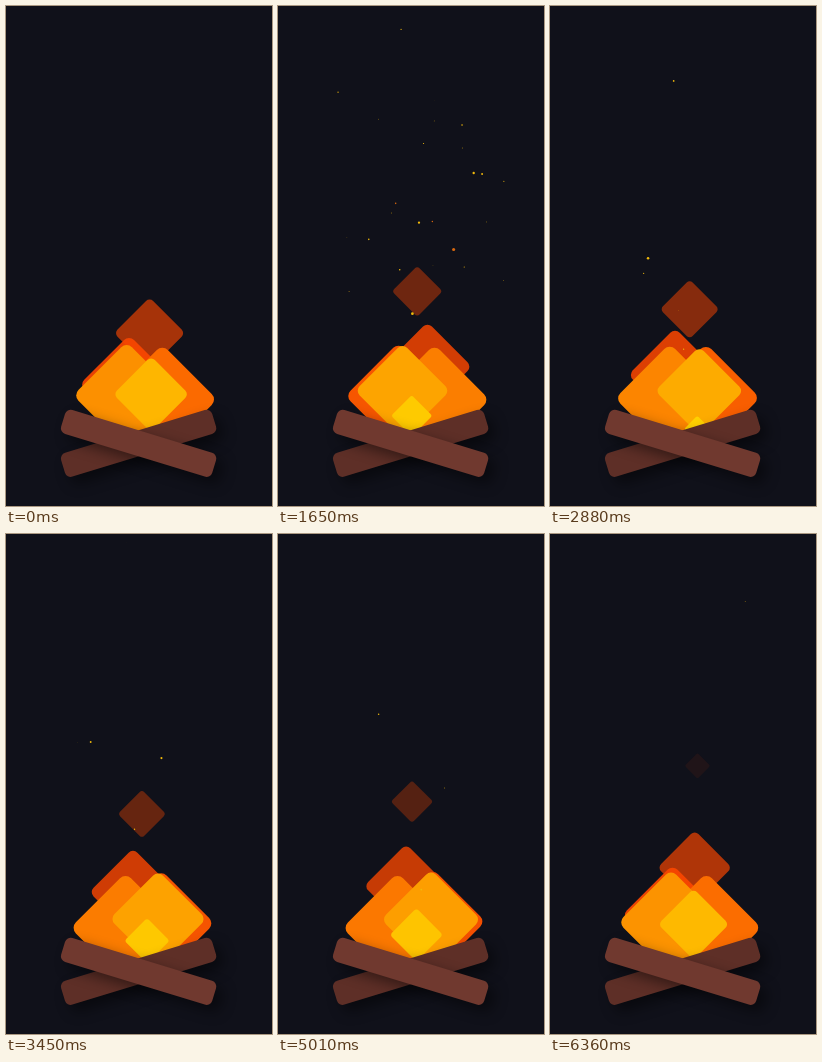
Write an HTML page with a canvas that moves like this. It is 266 px wide and 500 px high and loops after 6390 ms.

```html
<!DOCTYPE html>
<html lang="en">
<head>
<meta charset="utf-8">
<title>Campfire</title>
<style>
html, body { margin: 0; height: 100%; overflow: hidden; background: #10111a; }
canvas { display: block; }
</style>
</head>
<body>
<canvas id="stage" width="266" height="500"></canvas>
<script>
const ctx = document.getElementById('stage').getContext('2d');
const LOOP = 6390, BEAT = 255.3, CYCLE = 25;
const LIFE = 6, PEAK = 2.6;   // flame ages, in beats
const AXIS = 138, SPARKS = 44;

// Repeatable random number in 0..1 for spark i, property j.
function random(i, j) {
  const v = Math.sin(i * 127.1 + j * 311.7) * 43758.5453;
  return v - Math.floor(v);
}

function roundBar(x, y, w, h, r, angle, fill) {
  ctx.save();
  ctx.translate(x, y);
  ctx.rotate(angle);
  ctx.fillStyle = fill;
  ctx.beginPath();
  ctx.roundRect(-w / 2, -h / 2, w, h, r);
  ctx.fill();
  ctx.restore();
}

// Swells and leans out until PEAK, then shrinks, crosses the axis and flies up.
function flame(age, side) {
  if (age < 0 || age >= LIFE) return;
  const young = Math.max(0, PEAK - age), old = Math.max(0, age - PEAK);
  const u = young / PEAK + old / 3.7;
  const away = u ** 2.4;
  const w = 78 * (1 - away);
  const x = AXIS + side * (18.5 - 36.5 * away);
  const y = 394 + young ** 2 * (10.6 * young - 19.2) - 220 * (old / 3.7) ** 2.75;
  const green = Math.max(70, 220 - 38 * age);
  ctx.globalAlpha = 1 - (old / 3.4) ** 3;
  roundBar(x, y, w, w, w * .1, Math.PI / 4, `rgb(${255 - 1.5 * age},${green},0)`);
  ctx.globalAlpha = 1;
}

// One flame per beat, sides alternating.
function flames(beat) {
  for (let k = 0; k <= CYCLE; k++) flame(beat - k, k % 2 ? -1 : 1);
  // Those still burning from the previous round stay on top.
  for (let k = 1 - LIFE; k <= 0; k++) flame(beat - k, k % 2 ? 1 : -1);
}

// A burst at the start that thins out to a few stragglers.
function sparks(t) {
  for (let i = 0; i < SPARKS; i++) {
    const age = t - 5600 * (i / SPARKS) ** 5;
    const life = 1200 + 1000 * random(i, 1);
    if (age <= 0 || age >= life) continue;
    const reach = (age / 1000) ** .55;
    const spread = 90 * (random(i, 2) + random(i, 3) + random(i, 4) - 1.5);
    const height = 70 + 250 * random(i, 5);
    const size = (.5 + 1.4 * random(i, 6)) * Math.min(1, 2 - 2 * age / life);
    ctx.fillStyle = random(i, 7) < .12 ? '#d8680f' : '#f0b80b';
    ctx.beginPath();
    ctx.arc(AXIS + spread * reach, 385 - height * reach, size, 0, 7);
    ctx.fill();
  }
}

function logs() {
  ctx.save();
  ctx.shadowColor = 'rgba(0,0,0,.45)';
  ctx.shadowBlur = 14;
  ctx.shadowOffsetX = ctx.shadowOffsetY = 7;
  roundBar(132.6, 437.3, 158, 25, 6, -.297, '#5e2f27');
  roundBar(132.6, 437.3, 158, 25, 6, .297, '#70392f');
  ctx.restore();
}

function draw(now) {
  const t = now % LOOP;
  ctx.fillStyle = '#10111a';
  ctx.fillRect(0, 0, 266, 500);
  flames(t / BEAT);
  sparks(t);
  logs();
}

let start;
function tick(now) {
  start ??= now;
  draw(now - start);
  requestAnimationFrame(tick);
}
draw(0);
requestAnimationFrame(tick);
</script>
</body>
</html>
```
